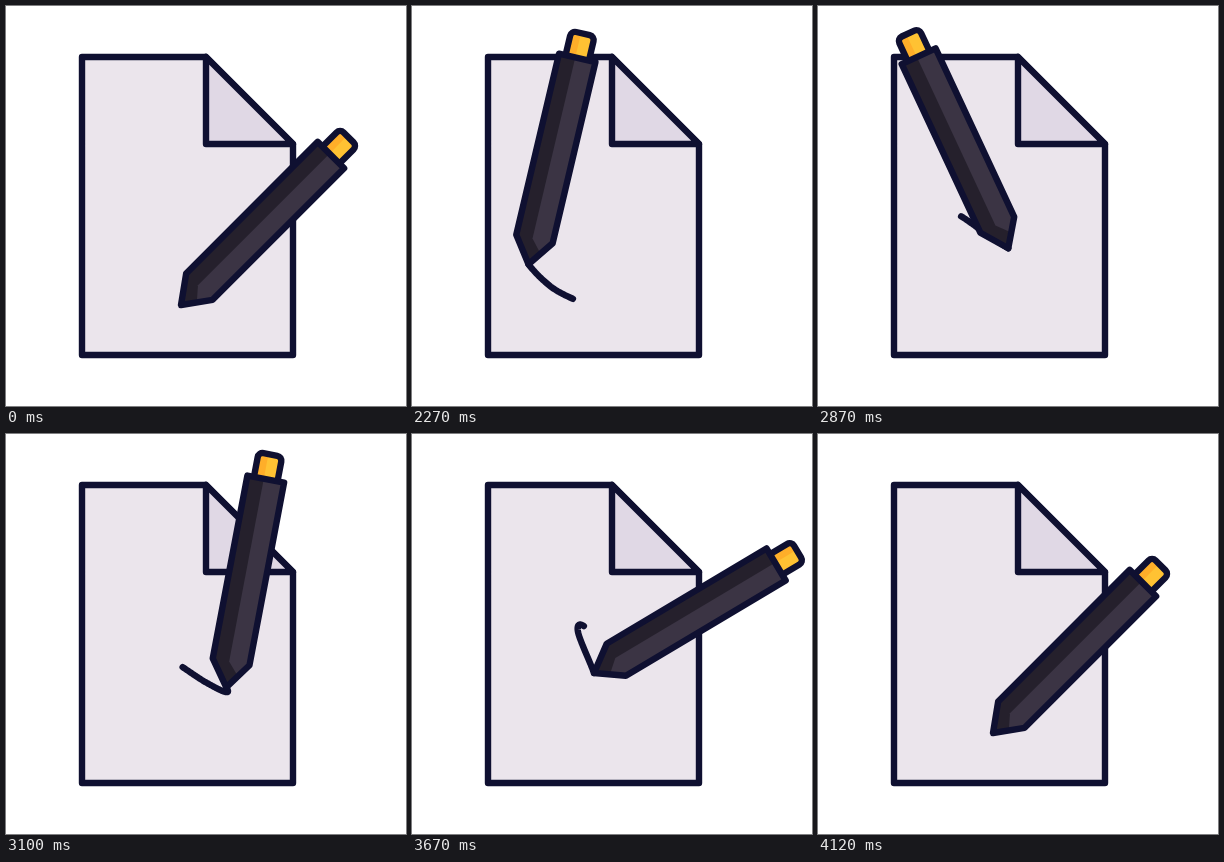
These frames come from a looping animation (400 px wide and 400 px high, 4150 ms). An HTML page with a canvas:

```html
<!DOCTYPE html>
<html lang="en">
<head>
<meta charset="utf-8">
<title>Pen and page</title>
<style>
html, body { margin: 0; width: 100%; height: 100%; overflow: hidden; background: #fff; }
canvas { display: block; width: 400px; height: 400px; }
</style>
</head>
<body>
<canvas id="stage" width="400" height="400"></canvas>
<script>
const ctx = document.getElementById('stage').getContext('2d');
const LOOP = 4150, START = 2020, STEP = 150;
const INK = '#0f1031', TRAIL = 57, BARREL = 212, HEADROOM = 37;

// Points of the scribble, evenly spaced in time: tip x, tip y, tilt in degrees
const PATH = [
  [175, 299, 45], [138, 280, 29], [109, 246, 5], [105.5, 207, -18.9],
  [134, 206, -28], [166, 226, -28], [201, 249, -21], [222, 257, 5],
  [199, 226, 34], [173, 193, 55], [166, 198, 59], [182, 239, 59.2],
  [191, 268, 55], [190, 290, 49], [175, 299, 45]
];
const LAST = PATH.length - 1, END = START + LAST * STEP;

const clamp = (v, lo, hi) => Math.max(lo, Math.min(hi, v));
const knot = i => PATH[clamp(i, 0, LAST)];

function pose(t) {
  const s = clamp((t - START) / STEP, 0, LAST);
  const i = Math.min(Math.floor(s), LAST - 1), u = s - i;
  const [x, y, deg] = [0, 1, 2].map(c => {
    const [a, b, d, e] = [-1, 0, 1, 2].map(k => knot(i + k)[c]);
    return b + (d - b) * u * u * (3 - 2 * u)
      + u * (1 - u) * ((1 - u) * (d - a) - u * (e - b)) / 2;
  });
  const tilt = deg * Math.PI / 180;
  // The barrel shortens so that the pen stays below the top edge.
  const len = Math.min(BARREL, (y - HEADROOM) / Math.cos(tilt));
  return { x, y, tilt, len };
}

function shape(points, fill, stroke = true) {
  ctx.beginPath();
  points.forEach(p => ctx.lineTo(...p));
  ctx.closePath();
  if (fill) {
    ctx.fillStyle = fill;
    ctx.fill();
  }
  if (stroke) ctx.stroke();
}

function drawPage() {
  shape([[76, 51], [200, 51], [287, 138], [287, 349], [76, 349]], '#ebe5ec');
  shape([[200, 51], [200, 138], [287, 138]], '#e0d8e5');
}

// Walks back along the pen's path until the line is long enough.
function drawTrail(t) {
  if (t <= START || t >= END) return;
  let left = TRAIL * Math.min(1, (END - t) / 230);
  let p = pose(t);
  ctx.beginPath();
  ctx.moveTo(p.x, p.y);
  for (let s = t - 4; s >= START && left > 0; s -= 4) {
    const q = pose(s), d = Math.hypot(q.x - p.x, q.y - p.y);
    const k = d > left ? left / d : 1;
    ctx.lineTo(p.x + (q.x - p.x) * k, p.y + (q.y - p.y) * k);
    left -= d;
    p = q;
  }
  ctx.stroke();
}

function drawPen({ x, y, tilt, len }) {
  const w = 18.7 * (BARREL / len) ** 0.4, n = -26, top = -len;
  ctx.save();
  ctx.translate(x, y);
  ctx.rotate(tilt);

  ctx.beginPath();
  ctx.roundRect(-12, top - 25, 24, 27, [5, 5, 0, 0]);
  ctx.fillStyle = '#ffc233';
  ctx.fill();
  ctx.fillStyle = '#ffae29';
  ctx.fillRect(-10, top - 22, 8, 22);
  ctx.stroke();

  const body = [[0, 0], [-w, n], [-w, top], [w, top], [w, n]];
  shape(body, '#25202c', false);
  shape([[-2, top], [w, top], [w, n], [w / 2, n / 2], [-2, n]], '#3b3444', false);
  shape(body);
  ctx.restore();
}

// The motion advances in pairs of 30 ms and 20 ms steps.
function stepped(t) {
  const r = (t - START) % 50;
  return t < START ? t : t - r + (r >= 30 ? 30 : 0);
}

function draw(t) {
  ctx.fillStyle = '#fff';
  ctx.fillRect(0, 0, 400, 400);
  ctx.strokeStyle = INK;
  ctx.lineWidth = 6.4;
  ctx.lineJoin = ctx.lineCap = 'round';
  drawPage();
  drawTrail(t);
  drawPen(pose(t));
}

const t0 = performance.now();
function tick() {
  draw(stepped((performance.now() - t0) % LOOP));
  requestAnimationFrame(tick);
}
tick();
</script>
</body>
</html>
```
